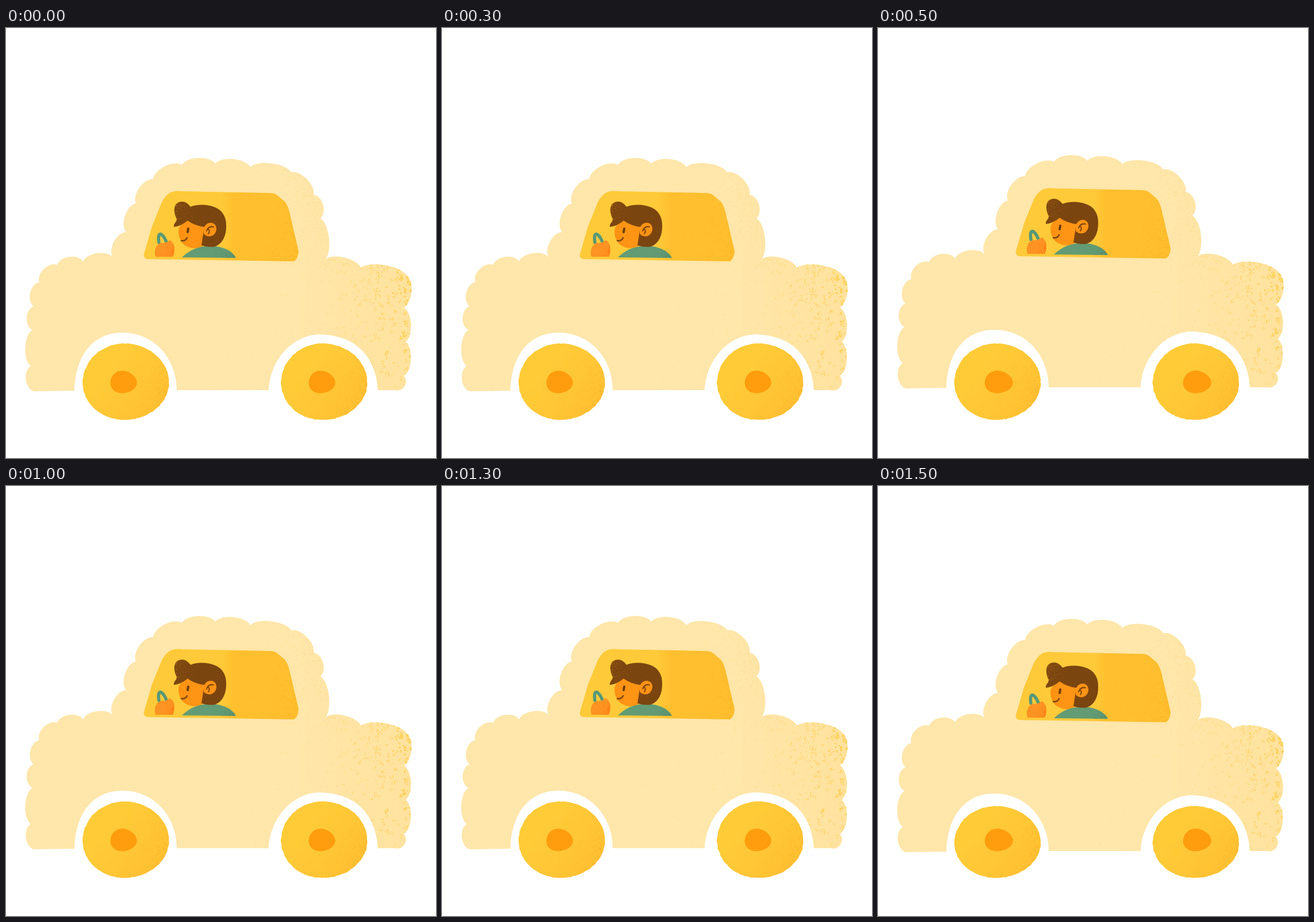
Write an HTML page with a canvas that moves like this. It is 748 by 748 pixels and loops after 2000 ms.

```html
<!DOCTYPE html>
<html lang="en">
<head>
<meta charset="utf-8">
<title>Fluffy car</title>
<style>
  html, body { margin: 0; width: 100%; height: 100%; overflow: hidden; background: #fff; }
  canvas { display: block; }
</style>
</head>
<body>
<canvas id="stage" width="748" height="748"></canvas>
<script>
const ctx = document.getElementById('stage').getContext('2d');

// Repeatable random numbers, so every redraw has the same grain
let seed = 1;
const random = () => (seed = seed * 16807 % 2147483647) / 2147483647;
const spread = () => random() + random() - 1;

// Corners between the puffs, clockwise from the front bumper
const corners = [
  [48, 632], [43, 588], [46, 525], [48, 484], [58, 442], [89, 412], [134, 406], [186, 399],
  [209, 355], [226, 305], [256, 263], [306, 238], [364, 236], [425, 242], [496, 251],
  [535, 290], [547, 331], [555, 403], [617, 417], [697, 430], [692, 486], [695, 546],
  [692, 605], [676, 630]
];
const puffDepth = 11;
const underside = 'L647 630C643 568 605 533 543 533C495 536 459 580 457 630L297 630' +
  'C297 575 258 530 203 530C150 530 121 570 119 631Z';

// Every puff bulges outwards by the same depth
function puffyOutline() {
  let [x, y] = corners[0], d = `M${x} ${y}`;
  for (const [ex, ey] of corners.slice(1)) {
    const dx = ex - x, dy = ey - y, out = puffDepth * 4 / 3 / Math.hypot(dx, dy);
    const hx = dy * out, hy = -dx * out;
    d += `C${x + hx + dx * .16} ${y + hy + dy * .16} ${ex + hx - dx * .16} ${ey + hy - dy * .16} ${ex} ${ey}`;
    [x, y] = [ex, ey];
  }
  return d;
}

const body = new Path2D(puffyOutline() + underside);
const pane = new Path2D('M293 284Q300 283 308 284L458 287Q467 287 472 291L485 302Q490 308 493 320L509 388Q508 402 501 406L246 402Q238 400 240 393L254 345L271 303Q280 286 293 284Z');
const face = new Path2D('M300 353C300 345 307 342 312 334L352 340L348 376C336 384 324 385 315 380C305 376 300 365 300 353Z');
const hair = new Path2D('M292 346C291 340 297 338 297 332C289 316 293 302 306 302C313 302 317 306 321 311C335 306 350 307 361 311C377 316 384 330 383 346C383 361 377 375 364 380C355 382 346 380 340 378L345 346Q328 344 316 335Q304 345 292 346Z');
const ear = new Path2D('M344 348C347 340 355 337 361 340C368 344 367 354 362 359C356 365 347 362 344 358Z');
const shirt = new Path2D('M306 399C318 387 335 378 358 379C378 380 394 388 400 400Z');
const hand = new Path2D('M259 393C258 383 263 376 269 374Q279 375 285 369Q293 374 293 385Q293 393 290 398L261 398Q259 397 259 393Z');

function fill(path, color) {
  ctx.fillStyle = color;
  ctx.fill(path);
}

function line(d, color, width) {
  ctx.strokeStyle = color;
  ctx.lineWidth = width;
  ctx.lineCap = 'round';
  ctx.stroke(new Path2D(d));
}

function fade(x0, y0, x1, y1, from, to) {
  const gradient = ctx.createLinearGradient(x0, y0, x1, y1);
  gradient.addColorStop(0, from);
  gradient.addColorStop(1, to);
  return gradient;
}

// Clumps of crumbs inside a path, denser and larger towards the corner (x1, y1)
function grain(path, color, count, x0, y0, x1, y1, size = 1, crumbs = 1) {
  ctx.save();
  ctx.clip(path);
  ctx.fillStyle = color;
  for (let i = 0; i < count; i++) {
    const u = Math.sqrt(random()), v = Math.sqrt(random());
    for (let j = 0; j < crumbs; j++) {
      const r = size * (.4 + random() * u * u);
      const x = x0 + (x1 - x0) * u + spread() * size * 3;
      const y = y0 + (y1 - y0) * v + spread() * size * 3;
      ctx.beginPath();
      ctx.ellipse(x, y, r, r * .7, random() * 3, 0, 7);
      ctx.fill();
    }
  }
  ctx.restore();
}

function blob(cx, cy, rx, ry, wobble = 0, roughness = 0) {
  const path = new Path2D();
  for (let i = 0; i < 120; i++) {
    const a = i / 120 * 2 * Math.PI;
    const r = 1 + wobble * Math.sin(3 * a + 1) + roughness * spread();
    path.lineTo(cx + rx * r * Math.cos(a), cy + ry * r * Math.sin(a));
  }
  path.closePath();
  return path;
}

function drawBody() {
  fill(body, fade(500, 0, 700, 0, '#ffe6aa', '#ffe29e'));
  grain(body, '#fbd37899', 1100, 330, 440, 570, 225, .9);
  grain(body, '#fbd070aa', 170, 260, 400, 640, 640, .9, 3);
  grain(body, '#ffcd4acc', 170, 540, 620, 710, 400, 1.4, 5);
  grain(body, '#ffcd4acc', 70, 560, 430, 710, 630, 1.3, 4);
}

function drawWindow() {
  fill(pane, fade(374, 0, 398, 0, '#ffca39', '#ffbf2e'));
  grain(pane, '#fbb02366', 1300, 375, 270, 510, 410);
}

function drawDriver() {
  fill(shirt, '#639b74');
  grain(shirt, '#477f6799', 250, 350, 380, 405, 402);
  fill(face, '#ff9415');
  grain(face, '#ff7d0b55', 200, 340, 335, 298, 385);
  fill(hair, '#7b4510');
  grain(hair, '#a7681599', 300, 335, 355, 290, 300);
  fill(ear, '#ff9314');
  line('M349 353Q352 344 361 346M351 349Q356 353 352 358', '#7b4510', 2);
  line('M317 349L316 355', '#6e3d0c', 4);
  line('M305 370Q312 371 315 365', '#7b4510', 2.6);
  line('M266 373C264 360 267 357 270 359Q276 363 280 375', '#579878', 5.5);
  fill(hand, '#fd9322');
  grain(hand, '#ff7a1277', 200, 270, 375, 293, 399);
}

function drawWheel(x, y, ry, hubX, hubRx) {
  const tire = blob(x, y, 75, ry, .008, .01);
  fill(tire, fade(x - 20, y - 30, x + 65, y + 45, '#ffcb37', '#ffc033'));
  grain(tire, '#fcb02688', 1100, x - 20, y - 50, x + 76, y + 67);
  fill(blob(hubX, 616, hubRx, 19.5, .035), '#ff9d0e');
}

// The car bounces by `lift`; the wheels stay on the ground and are squashed when it sinks
function draw(step) {
  seed = 4321;
  const lift = Math.round(-5 * Math.sin(step * Math.PI / 2));
  const ry = 66.5 - Math.max(0, lift) * .8;
  ctx.fillStyle = '#fff';
  ctx.fillRect(0, 0, 748, 748);
  ctx.save();
  ctx.translate(0, lift);
  drawBody();
  drawWindow();
  drawDriver();
  ctx.restore();
  for (const x of [207.5, 552.5]) {
    if (lift) drawWheel(x, 682 - ry, ry, x + 2, 24.5);
    else drawWheel(x + .5, 682 - ry, ry, x - 3.5, 23);
  }
}

let shown;
function tick() {
  const step = Math.floor(performance.now() % 2000 / 500);
  if (step !== shown) draw(shown = step);
  requestAnimationFrame(tick);
}
tick();
</script>
</body>
</html>
```
